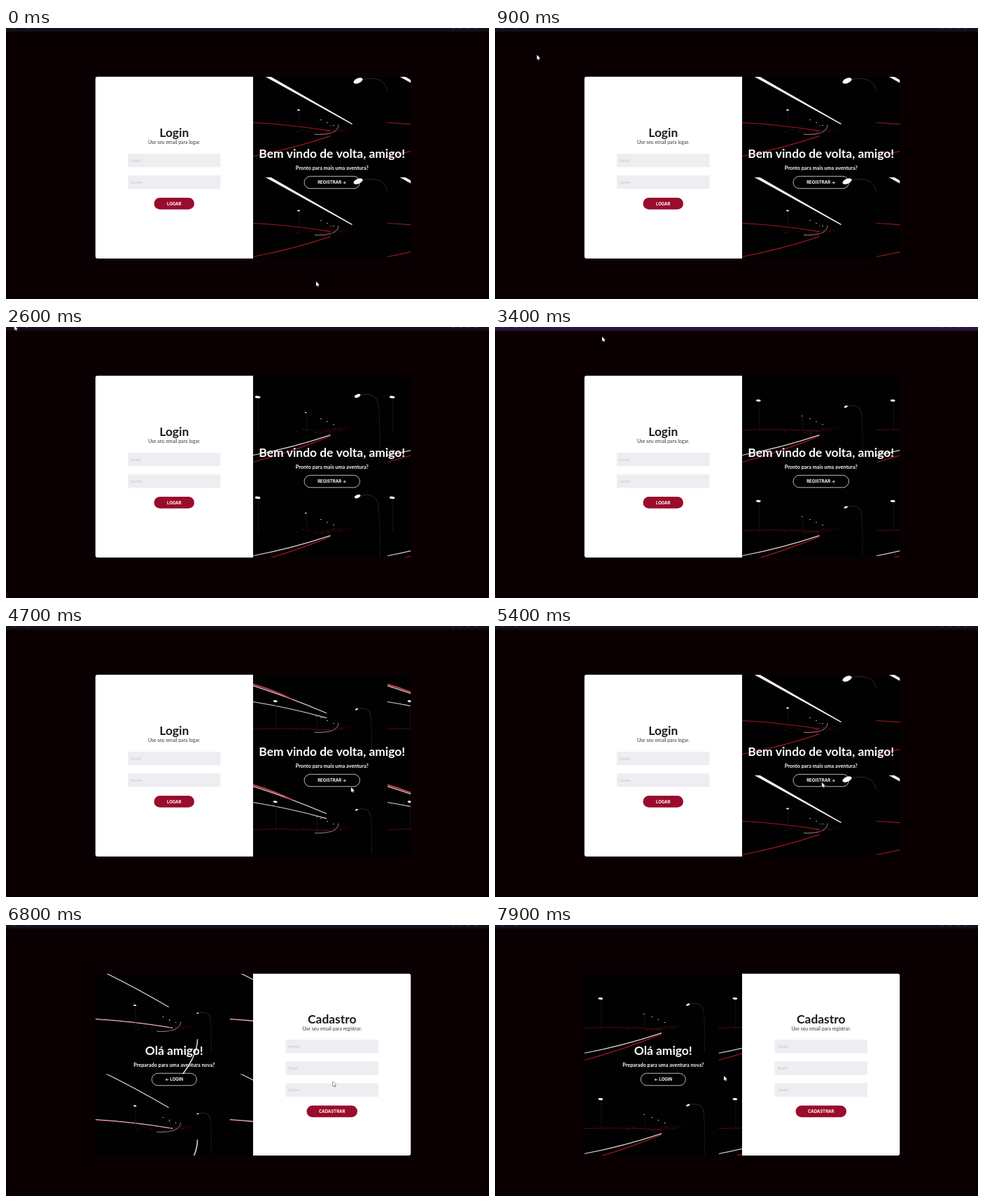
An HTML page with a canvas for the animation above (8 s loop, 690x388 px).

```html
<!DOCTYPE html>
<html lang="pt">
<head>
<meta charset="utf-8">
<title>Login</title>
<style>
  html, body { margin: 0; width: 100%; height: 100%; overflow: hidden; background: #0a0001; }
  canvas { display: block; }
</style>
</head>
<body>
<canvas id="stage" width="690" height="388"></canvas>
<script>
const ctx = document.getElementById('stage').getContext('2d');
const LOOP = 8000, STEP = 100, SLOTS = 9;
const CARD = { x: 127.5, y: 69.5, w: 451, h: 260.8 };
const HALF = CARD.w / 2, MID = HALF / 2;
const TILE = { w: 192, h: 144 };
const SLIDE = { start: 5650, length: 1000 };
const TITLE = '700 17.4px Lato, sans-serif';
const LEAD = '700 7.3px Lato, sans-serif';
const NOTE = '400 6.9px Lato, sans-serif';
const BUTTON = '700 6px Inter, sans-serif';
const FIELD = '400 6px Lato, sans-serif';
const RED = '#a0161b', WHITE = '#dcd6d6', PINK = '#c8404e', DIM = '#4a0c10';

// Light trails: height at the left edge, first and last slot, colour
const rays = [
  [-8, 1, 2, WHITE], [-70, 2, 3, RED], [16, 4, 4, WHITE], [14, 4, 4, PINK], [39, 4, 4, WHITE],
  [66, 0, 3, RED], [65, 1, 1, WHITE], [78, 2, 6, DIM], [103, 3, 3, RED],
  [114, 0, 0, RED], [114, 3, 3, WHITE], [114, 5, 7, WHITE], [124, 5, 8, RED]
];

// Pointer stops: time, x, y
const stops = [
  [100, 443, 363], [1000, 12, -2], [2800, 12, -2], [3400, 153, 14],
  [4700, 493, 231], [5300, 467, 224], [7300, 467, 224], [7900, 327, 216]
];

const clamp = v => Math.max(0, Math.min(1, v));
const mix = (a, b, k) => a + (b - a) * k;

function bezier(x1, x2) {
  const at = (a, b, s) => 3 * a * s * (1 - s) ** 2 + 3 * b * s * s * (1 - s) + s ** 3;
  return x => {
    let lo = 0, hi = 1;
    for (let i = 0; i < 24; i++) {
      const mid = (lo + hi) / 2;
      if (at(x1, x2, mid) < x) lo = mid; else hi = mid;
    }
    return at(0, 1, lo);
  };
}
const easeInOut = bezier(.42, .58);
const easeOut = bezier(0, .58);

function text(str, x, y, font, color, align = 'center') {
  ctx.font = font;
  ctx.fillStyle = color;
  ctx.textAlign = align;
  ctx.fillText(str, x, y);
}

function pill(y, w, h, label, solid, mid = MID) {
  ctx.beginPath();
  ctx.roundRect(mid - w / 2, y, w, h, h / 2);
  if (solid) {
    ctx.fillStyle = '#990c2c';
    ctx.fill();
  } else {
    ctx.strokeStyle = '#e8e8e8';
    ctx.lineWidth = .8;
    ctx.stroke();
  }
  text(label, mid, y + h / 2 + 2.1, BUTTON, '#fff');
}

function form(alpha, title, titleY, note, labels, fieldY, button, width) {
  ctx.globalAlpha = alpha;
  text(title, MID, titleY, TITLE, '#1d1a20');
  text(note, MID, titleY + 10, NOTE, '#3a373c');
  labels.forEach((label, i) => {
    const y = fieldY + i * 31.2;
    ctx.fillStyle = '#efedf2';
    ctx.fillRect(46.5, y, 132.5, 19.3);
    text(label, 50.5, y + 11.8, FIELD, '#c6c2cb', 'left');
  });
  pill(fieldY + labels.length * 31.2 + .8, width, 16.6, button, true);
}

function clipTo(x, y, w, h, radius = 0) {
  ctx.beginPath();
  ctx.roundRect(x, y, w, h, radius);
  ctx.clip();
}

function glow(x, y, rx, ry, tilt = 0) {
  ctx.fillStyle = '#fff';
  ctx.beginPath();
  ctx.ellipse(x, y, rx, ry, tilt, 0, Math.PI * 2);
  ctx.fill();
}

function curve(color, width, x0, y0, cx, cy, x1, y1) {
  ctx.strokeStyle = color;
  ctx.lineWidth = width;
  ctx.beginPath();
  ctx.moveTo(x0, y0);
  ctx.quadraticCurveTo(cx, cy, x1, y1);
  ctx.stroke();
}

// A trail runs from the left edge towards its vanishing point
function ray(y, color) {
  const upper = y < 50;
  const endX = upper ? 150 : 130, endY = upper ? 72 : 80;
  const reach = upper ? (color === PINK ? .38 : .7) : .85;
  const bend = y > 100 ? 4 : -3;
  const x1 = endX * reach, y1 = mix(y, endY, reach);
  curve(color, color === PINK ? 2 : 1.2, 0, y, x1 / 2, (y + y1) / 2 + bend, x1, y1);
}

function beam() {
  ctx.fillStyle = '#f6f2f2';
  ctx.beginPath();
  ctx.moveTo(17, 0);
  ctx.lineTo(25, 0);
  ctx.lineTo(142, 67.5);
  ctx.lineTo(141, 68.5);
  ctx.fill();
}

function leftLamp(u) {
  const x = 65 - (u < 0 ? 46 : 75) * u, y = 48 - 22 * u;
  const r = Math.max(.8, 2 + 2.4 * u);
  curve('#161315', 1, x + 1, y, x + 1, y + 20, x + 1, 80);
  glow(x, y, r, r * .45, .1);
}

function rightLamp(u) {
  const grow = u ** 2.4, s = 1 + 1.4 * u ** 3;
  const x = 146 + 4 * u, y = 57 - 51 * grow, r = 1.4 + 5.6 * grow;
  curve('#302c30', .9, x, y, x + 16 * s, y - 5 * s, x + 18 * s, y + 8 * s);
  curve('#1e1b1e', .9, x + 18 * s, y + 8 * s, x + 20 * s, y + 30 * s, x + 19 * s, y + 56 * s);
  glow(x, y, r, r * .5, -.4);
}

function road(slot) {
  const u = slot / SLOTS;
  ctx.fillStyle = '#100304';
  ctx.beginPath();
  ctx.ellipse(115, 78, 26, 3, -.12, 0, Math.PI * 2);
  ctx.fill();
  ctx.fillStyle = '#4a1013';
  for (let i = 0; i < 8; i++) ctx.fillRect(60 + i * 9, 79 + Math.sin(i * 5) * 3, 4, .8);
  for (let i = 0; i < 3; i++) glow(97 + i * 9, 62 + i * 4, .8, .5);

  for (const [y, first, last, color] of rays) {
    if (slot >= first && slot <= last) ray(y, color);
  }
  if (slot < 5) curve('#a8a2a2', .8, 88, 83, 122, 84, 122, 69);
  if (slot === 0) beam();
  if (slot === 1) curve(WHITE, 1.6, 125, TILE.h, 146, 116, 146, 94);

  leftLamp(u - 1);
  leftLamp(u);
  rightLamp(u || 1);
}

function forms(p) {
  const shown = p ** 1.4;
  ctx.save();
  ctx.translate(CARD.x + HALF * p, 0);
  ctx.fillStyle = '#fff';
  ctx.fillRect(0, CARD.y, HALF, CARD.h);
  form(1 - shown, 'Login', 156.2, 'Use seu email para logar.',
    ['Email', 'Senha'], 179.9, 'LOGAR', 57.5);
  form(shown ** 3, 'Cadastro', 140.5, 'Use seu email para registrar.',
    ['Nome', 'Email', 'Senha'], 164.2, 'CADASTRAR', 72.5);
  ctx.restore();
}

function greeting(shift, alpha, title, lead, label, width) {
  const mid = MID + HALF * shift;
  ctx.globalAlpha = alpha;
  text(title, mid, 186.3, TITLE, '#fff');
  text(lead, mid, 203, LEAD, '#fff');
  pill(212.3, width, 17.5, label, false, mid);
  ctx.globalAlpha = 1;
}

function overlay(p, q, slot) {
  ctx.save();
  ctx.translate(CARD.x + HALF * (1 - p), 0);
  clipTo(0, CARD.y, HALF, CARD.h);
  ctx.fillStyle = '#020102';
  ctx.fillRect(-1, CARD.y - 1, HALF + 2, CARD.h + 2);
  for (let i = 0; i < 4; i++) {
    ctx.save();
    ctx.translate(i % 2 * TILE.w, CARD.y + (i >> 1) * TILE.h);
    clipTo(0, 0, TILE.w, TILE.h);
    road(slot);
    ctx.restore();
  }
  greeting(-q, 1 - q, 'Bem vindo de volta, amigo!',
    'Pronto para mais uma aventura?', 'REGISTRAR →', 79.5);
  greeting(1 - q, 1, 'Olá amigo!',
    'Preparado para uma aventura nova?', '← LOGIN', 64);
  ctx.restore();
}

function topBar(t) {
  const lit = t >= 2900 && t < 3600;
  ctx.fillStyle = lit ? '#2d1640' : '#15111d';
  ctx.fillRect(0, 0, 690, 4.5);
  ctx.fillStyle = lit ? '#1c1028' : '#0f0a12';
  ctx.fillRect(0, 4.5, 690, 1.5);
  ctx.fillStyle = '#3a3645';
  for (let i = 0; i < 4; i++) ctx.fillRect(637 + i * 11, 0, 4, 1);
  for (let i = 0; i < 2; i++) ctx.fillRect(9 + i * 19, 0, 4, 1);
}

function cursor(t) {
  let i = 0;
  while (i < stops.length - 2 && t >= stops[i + 1][0]) i++;
  const [t0, x0, y0] = stops[i], [t1, x1, y1] = stops[i + 1];
  const k = clamp((t - t0) / (t1 - t0));
  ctx.save();
  ctx.translate(mix(x0, x1, k), mix(y0, y1, k));
  const arrow = new Path2D('M0 0V6.6L1.5 5.3L2.6 7.6L3.6 7.1L2.6 4.9L4.7 4.8Z');
  ctx.strokeStyle = '#222';
  ctx.lineWidth = .9;
  ctx.stroke(arrow);
  ctx.fillStyle = '#fff';
  ctx.fill(arrow);
  ctx.restore();
}

function draw(t) {
  const k = clamp((t - SLIDE.start) / SLIDE.length);
  ctx.fillStyle = '#0a0001';
  ctx.fillRect(0, 0, 690, 388);
  topBar(t);
  ctx.save();
  clipTo(CARD.x, CARD.y, CARD.w, CARD.h, 4);
  const p = easeInOut(k);
  forms(p);
  overlay(p, easeOut(k), (t / 50) % SLOTS);
  ctx.restore();
  cursor(t);
}

const began = performance.now();
function tick() {
  const t = (performance.now() - began) % LOOP;
  draw(Math.floor(t / STEP) * STEP);
  requestAnimationFrame(tick);
}
tick();
</script>
</body>
</html>
```
